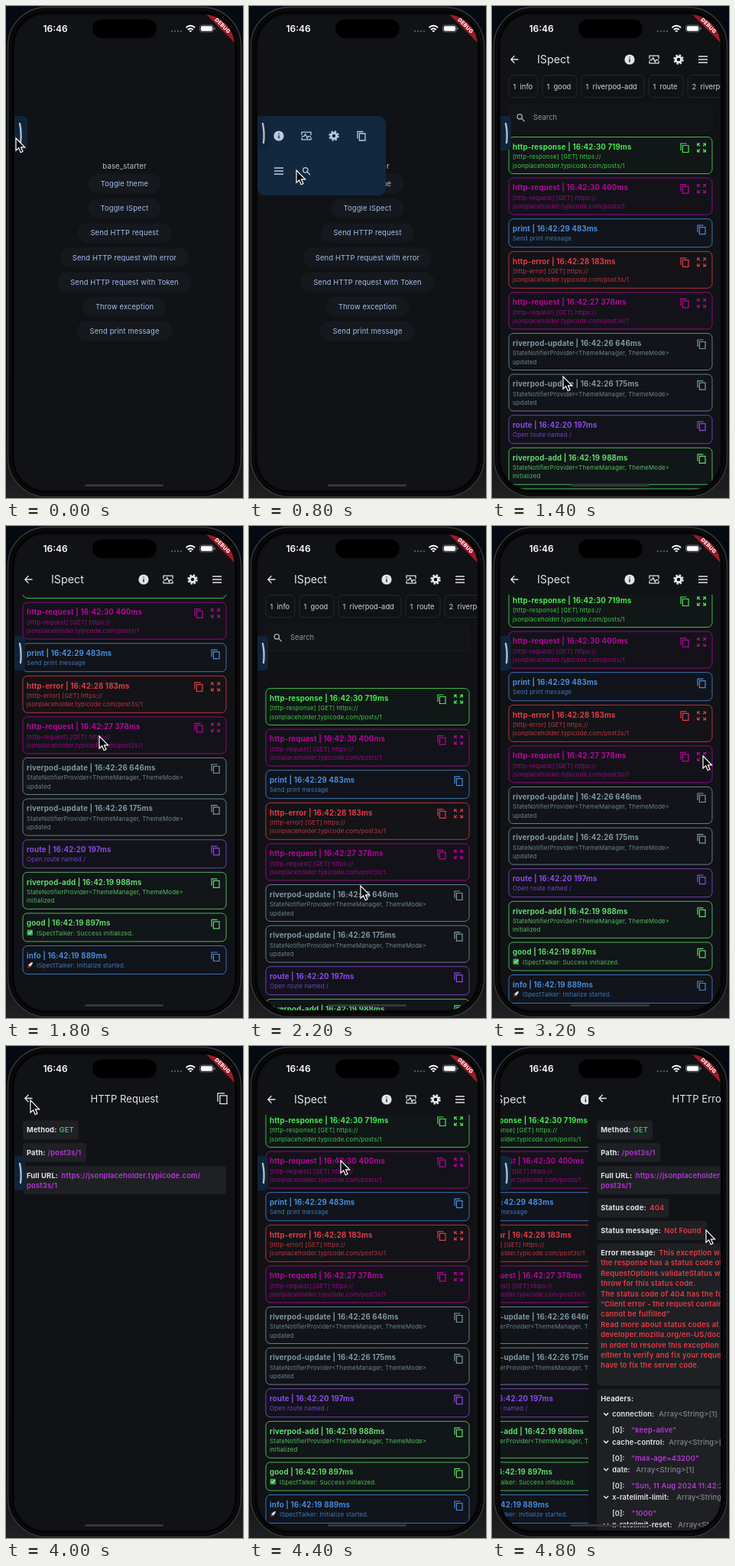
Animation of 310x644 px, one loop 5000 ms. Source, as an HTML page:

```html
<!DOCTYPE html>
<html lang="en">
<head>
<meta charset="utf-8">
<title>Log viewer demo</title>
<style>
  html, body { margin: 0; width: 100%; height: 100%; overflow: hidden; background: #07090d; }
  svg { display: block; width: 100vw; height: 100vh; }
  text { font-family: Inter, Roboto, sans-serif; }
</style>
</head>
<body>
<svg id="stage" viewBox="0 0 310 644"></svg>
<script>
const BG = '#101216', WHITE = '#e3e4ea', GREEN = '#45c05a', PURPLE = '#b838d8', RED = '#e83a47', GREY = '#85878d';

const rect = (x, y, w, h, r, fill, extra = '') =>
  `<rect x="${x}" y="${y}" width="${w}" height="${h}" rx="${r}" fill="${fill}" ${extra}/>`;
const text = (x, y, str, size, fill, { weight = 400, gap = 0, mid, fade = 1 } = {}) =>
  `<text x="${x}" y="${y}" font-size="${size}" fill="${fill}" font-weight="${weight}" letter-spacing="${gap}"` +
  ` fill-opacity="${fade}"${mid ? ' text-anchor="middle"' : ''}>${str.replace(/</g, '&lt;').replace(/ {2}/g, '\u00a0\u00a0')}</text>`;
const group = (id, body) => `<g id="${id}">${body}</g>`;

const icons = {
  copy: '<path d="M-5 3.5V-5.5H2.5M-2.6-3H5V6H-2.6Z"/>',
  expand: '<path d="M-5.3-2V-5.3H-2M2-5.3H5.3V-2M5.3 2V5.3H2M-2 5.3H-5.3V2M-5-5l3 3M5-5l-3 3M5 5l-3-3M-5 5l3-3"/>',
  back: '<path d="M5 0H-4.5M0-4.7L-4.7 0L0 4.7"/>',
  menu: '<path d="M-6-4H6M-6 0H6M-6 4H6"/>',
  info: '<circle r="6.6" fill="currentColor" stroke="none"/><path d="M0-.8V3.6M0-3.6V-2.2" stroke="#111318"/>',
  pulse: '<path d="M-6-1V-4.8H6V-1M-6 2V4.8H6V2M-6 .6H-3L-1.2-2.4L1.2 3L2.6 .6H6"/>',
  gear: '<circle r="3.6" stroke-width="2.8"/><circle r="5.6" stroke-width="2.2" stroke-dasharray="2.5 1.9"/>',
  search: '<circle cx="-1.2" cy="-1.2" r="3.2"/><path d="M1.2 1.2L5 5"/>',
  down: '<path d="M-3-1.5L0 1.5L3-1.5"/>'
};
const icon = (name, x, y, color = WHITE, width = 1.3, scale = 1) =>
  `<g transform="translate(${x} ${y}) scale(${scale})" color="${color}" stroke="${color}" stroke-width="${width}" fill="none">${icons[name]}</g>`;
const backdrop = rect(11, 0, 288, 644, 0, BG);

function homePage() {
  const buttons = [['Toggle theme', 95], ['Toggle ISpect', 95], ['Send HTTP request', 122],
    ['Send HTTP request with error', 168], ['Send HTTP request with Token', 175],
    ['Throw exception', 109], ['Send print message', 124]];
  return backdrop + text(155, 213, 'base_starter', 9.5, '#bfc1c7', { gap: .15, mid: 1 }) +
    buttons.map(([label, w], i) => {
      const y = 232.5 + i * 32.2;
      return rect(155 - w / 2, y - 13, w, 26, 13, '#15181d') +
        text(155, y + 3.4, label, 9.4, '#a3bfef', { gap: .15, mid: 1 });
    }).join('');
}

const PLACE = 'jsonplaceholder.typicode.com/';
const STATE = 'StateNotifierProvider<ThemeManager, ThemeMode>';
const logs = [
  ['http-response', '30 719ms', '#46e850', ['[http-response] [GET] https://', PLACE + 'posts/1'], 1],
  ['http-request', '30 400ms', '#b3079b', ['[http-request] [GET] https://', PLACE + 'posts/1'], 1],
  ['print', '29 483ms', '#478ddd', ['Send print message']],
  ['http-error', '28 183ms', '#e03c46', ['[http-error] [GET] https://', PLACE + 'post3s/1'], 1],
  ['http-request', '27 378ms', '#b3079b', ['[http-request] [GET] https://', PLACE + 'post3s/1'], 1],
  ['riverpod-update', '26 646ms', '#7b98a4', [STATE, 'updated']],
  ['riverpod-update', '26 175ms', '#7b98a4', [STATE, 'updated']],
  ['route', '20 197ms', '#8c49e4', ['Open route named /']],
  ['riverpod-add', '19 988ms', '#63d96d', [STATE, 'initialized']],
  ['good', '19 897ms', '#5fd868', ['ISpectTalker: Success initialized.'], 0, 'check'],
  ['info', '19 889ms', '#438be0', ['ISpectTalker: Initialize started.'], 0, 'rocket']
];
const emoji = {
  check: rect(0, -7, 7.5, 7.5, 1.2, '#35a94a') + '<path d="M1.6-3.3L3.2-1.6L6-5.4" stroke="#fff" fill="none"/>',
  rocket: '<path d="M7.5-7.2Q3.5-7 1.8-3L3.5-1.4Q7.2-3.2 7.5-7.2" fill="#cfd6de"/>' +
    '<path d="M3-5L.3-3.6L1.8-3ZM5.4-2.4L4 .4L3.5-1.4ZM1.6-2.4L.2 .4L2.8-1Z" fill="#e0463c"/>'
};

function logCards() {
  let y = 171.5;
  return logs.map(([name, stamp, color, lines, wide, mark]) => {
    const top = y, tall = lines.length > 1;
    y += tall ? 53.6 : 42.6;
    return rect(22, top, 266, tall ? 48 : 37, 6, color, `fill-opacity=".015" stroke="${color}" stroke-opacity=".8"`) +
      text(27, top + 16.3, `${name} | 16:42:${stamp}`, 9.7, color, { weight: 700, gap: .15 }) +
      lines.map((line, i) => text(mark ? 40 : 27, top + 28.6 + i * 11.5, line, 7.9, color, { gap: .15, fade: .85 })).join('') +
      (mark ? `<g transform="translate(27.5 ${top + 28.6})">${emoji[mark]}</g>` : '') +
      icon('copy', wide ? 252 : 274, top + 14, color, 1.2) +
      (wide ? icon('expand', 274, top + 14, color, 1.2) : '');
  }).join('');
}

function listPage() {
  const chips = [['1  info', 22, 38], ['1  good', 66, 45], ['1  riverpod-add', 117, 82],
    ['1  route', 205, 45], ['2  riverpod-update', 256, 98]];
  const top = chips.map(([label, x, w]) =>
      rect(x, 90.5, w, 29, 6, BG, 'stroke="#25282d"') + text(x + 5.5, 108.5, label, 9.4, '#d2d3d9')).join('') +
    rect(22, 129, 266, 35, 6, '#121418', 'stroke="#181a1f"') +
    icon('search', 37.5, 146, '#a4a6ad', 1.4) + text(54, 149.3, 'Search', 9.4, '#93959c');
  return backdrop + icon('back', 29.5, 70) + text(59, 75, 'ISpect', 14.3, WHITE) +
    icon('info', 180, 70) + icon('pulse', 212, 70) + icon('gear', 244, 70) + icon('menu', 276, 70, WHITE, 1.5) +
    `<g clip-path="url(#body)">${group('top', top)}${group('cards', logCards())}</g>`;
}

// One field card: bold label, then coloured value lines
const field = (y, w, h, label, valueX, value, color, more = []) => {
  const bold = { weight: 600, gap: .2 };
  return rect(22, y, w, h, 4, '#1e2024') + text(27, y + 15.5, label, 9.4, WHITE, { weight: 700, gap: .15 }) +
    text(valueX, y + 15.5, value, 9.4, color, bold) +
    more.map((line, i) => text(27, y + 15.5 + 13.4 * (i + 1), line, 9.4, color, bold)).join('');
};
const detailPage = title => backdrop + icon('back', 29.5, 68.5) +
  text(155, 73.6, title, 13.1, WHITE, { mid: 1 }) + icon('copy', 283, 68.5, WHITE, 1.1, 1.2) +
  field(97.5, 73, 25, 'Method:', 69.5, 'GET', GREEN) +
  field(127, 83, 25, 'Path:', 54.5, '/post3s/1', PURPLE) +
  field(157, 266, 37, 'Full URL:', 72.5, 'https://' + PLACE, PURPLE, ['post3s/1']);

function errorPage() {
  const message = ['the response has a status code of 404 and', 'RequestOptions.validateStatus was configured to',
    'throw for this status code.', 'The status code of 404 has the following meaning:',
    '“Client error - the request contains bad syntax or', 'cannot be fulfilled”', 'Read more about status codes at',
    'developer.mozilla.org/en-US/docs/Web/HTTP', 'In order to resolve this exception you typically have',
    'either to verify and fix your request code or you', 'have to fix the server code.'];
  const headers = [['connection', 57, 'keep-alive'], ['cache-control', 70, 'max-age=43200'],
    ['date', 27, 'Sun, 11 Aug 2024 11:42:28 GMT'], ['x-ratelimit-limit', 80, '1000'], ['x-ratelimit-reset', 82, '1723']];
  return detailPage('HTTP Error') +
    field(199.5, 94, 25, 'Status code:', 91, '404', RED) +
    field(229, 144, 25, 'Status message:', 110, 'Not Found', RED) +
    field(258.5, 266, 186, 'Error message:', 103, 'This exception was thrown because', RED, message) +
    rect(22, 449, 266, 220, 4, '#1e2024') + text(27, 464.8, 'Headers:', 9.4, WHITE, { weight: 700, gap: .15 }) +
    headers.map(([key, w, value], i) => {
      const y = 485.3 + i * 36.2;
      return icon('down', 34, y - 3.4, WHITE, 1.5) + text(42, y, key + ':', 9.4, WHITE, { weight: 600, gap: .1 }) +
        text(46 + w, y, 'Array<String>[1]', 9.4, GREY, { weight: 500, gap: .15 }) +
        text(42, y + 21, '[0]:', 9.4, WHITE, { weight: 600 }) +
        text(67, y + 21, `"${value}"`, 9.4, PURPLE, { weight: 600, gap: .15 });
    }).join('');
}

const panel = rect(0, 144, 168, 104, 10, '#12283f') +
  ['info', 'pulse', 'gear', 'copy'].map((name, i) => icon(name, 28 + i * 36, 170, '#b9cbe2')).join('') +
  ['menu', 'search'].map((name, i) => icon(name, 28 + i * 36, 216, '#b9cbe2')).join('');

const statusBar = text(48.5, 34, '16:46', 12, '#fff', { weight: 600 }) +
  rect(113, 17.5, 84, 24.5, 12.2, '#000') +
  [217, 221, 225, 229].map(x => `<circle cx="${x}" cy="33" r="1.2" fill="#55575c"/>`).join('') +
  '<g fill="none" stroke="#fff" stroke-width="1.9"><path d="M235.5 28.3Q241.3 23 247.1 28.3M237.8 31Q241.3 27.8 244.8 31"/></g>' +
  '<path d="M239.3 32.4Q241.3 30.9 243.3 32.4L241.3 34.6Z" fill="#fff"/>' +
  rect(253.5, 25, 18, 9, 2.8, 'none', 'stroke="#77797e" stroke-width=".8"') + rect(254.8, 26.3, 15.4, 6.4, 1.8, '#fff') +
  rect(272.4, 28, 1.3, 3, .6, '#77797e') +
  '<path d="M262 11H279L299 31V48Z" fill="#a01a26"/><g transform="translate(283.6 25.6) rotate(45)">' +
  text(0, 2.6, 'DEBUG', 6.9, '#fff', { weight: 800, gap: .3, mid: 1 }) + '</g>' +
  rect(103, 626, 103, 3, 1.5, '#34363a');

const stage = document.getElementById('stage');
stage.innerHTML = `<defs>
  <linearGradient id="desk" x2="0" y2="1"><stop stop-color="#050a13"/><stop offset=".4" stop-color="#050608"/><stop offset=".85" stop-color="#08090a"/><stop offset="1" stop-color="#202122"/></linearGradient>
  <clipPath id="screen">${rect(11, 11, 288, 623, 41, '#000')}</clipPath>
  <clipPath id="body">${rect(11, 90, 288, 554, 0, '#000')}</clipPath></defs>` +
  rect(0, 0, 310, 644, 0, 'url(#desk)') +
  rect(2.5, 1.5, 305, 641, 51, '#050506', 'stroke="#303133" stroke-width="1.8"') +
  rect(6, 5, 298, 634, 47, 'none', 'stroke="#121314"') +
  '<g clip-path="url(#screen)">' +
  group('home', homePage()) + group('list', listPage()) +
  group('request', detailPage('HTTP Request')) + group('error', errorPage()) + group('panel', panel) +
  rect(1, 144, 24, 45, 6, '#10243a', 'id="tab"') +
  '<path d="M18 154Q20.6 166 19 179" stroke="#b4bcc6" stroke-width="2.4" stroke-linecap="round" fill="none"/>' +
  statusBar + '</g>' +
  group('cursor', '<path d="M0 0V16.2L3.7 12.8L6.2 18.7L9 17.5L6.5 11.8H11.6Z" fill="#000" stroke="#fff" stroke-width="1.2"/>');

// Keys are [time, value, ...]; values run straight between keys
function track(keys, t) {
  const i = keys.findIndex(k => k[0] > t);
  if (i === 0) return keys[0].slice(1);
  if (i < 0) return keys[keys.length - 1].slice(1);
  const a = keys[i - 1], b = keys[i], f = (t - a[0]) / (b[0] - a[0]);
  return a.slice(1).map((v, n) => v + (b[n + 1] - v) * f);
}
const pushAt = t => [[t, 1], [t + 200, .4], [t + 400, .02], [t + 600, 0]];
const listIn = pushAt(800);
const requestIn = [...pushAt(3200), [4000, 0], [4200, .6], [4400, 1]];
const errorIn = pushAt(4600);
const panelOpen = [[400, 0], [600, .82], [800, 1]];
const scroll = [[1400, 0], [1600, -60], [1800, -125], [2000, -30], [2200, 41], [2400, 12],
  [2600, -134], [2800, -100], [3000, -88], [3200, -87]];
const pointer = [[0, 13, 173], [400, 14, 172], [600, 40, 180], [800, 62, 215], [1000, 66, 222], [1200, 82, 370],
  [1400, 93, 485], [1800, 122, 275], [2000, 135, 330], [2200, 146, 471], [2400, 155, 440], [2600, 162, 233],
  [2800, 190, 250], [3000, 245, 285], [3200, 276, 301], [3400, 274, 300], [3600, 142, 224], [3800, 78, 109],
  [4000, 32, 71], [4200, 33, 72], [4400, 120, 150], [4600, 279, 240], [4800, 280, 241]];

const move = (id, x, y = 0) => document.getElementById(id).setAttribute('transform', `translate(${x} ${y})`);

function draw() {
  const t = Math.floor(performance.now() % 5000 / 200) * 200;
  const [list] = track(listIn, t), [request] = track(requestIn, t), [error] = track(errorIn, t);
  const [y] = track(scroll, t);
  move('home', -96 * (1 - list));
  move('list', 288 * list - 96 * (2 - request - error));
  move('request', 288 * request);
  move('error', 288 * error);
  move('top', 0, Math.min(0, y));
  move('cards', 0, y);
  move('panel', t < 1000 ? 11 - 168 * (1 - track(panelOpen, t)[0]) : -200);
  move('tab', t < 1000 ? 3 : 0);
  move('cursor', ...track(pointer, t));
  requestAnimationFrame(draw);
}
draw();
</script>
</body>
</html>
```
